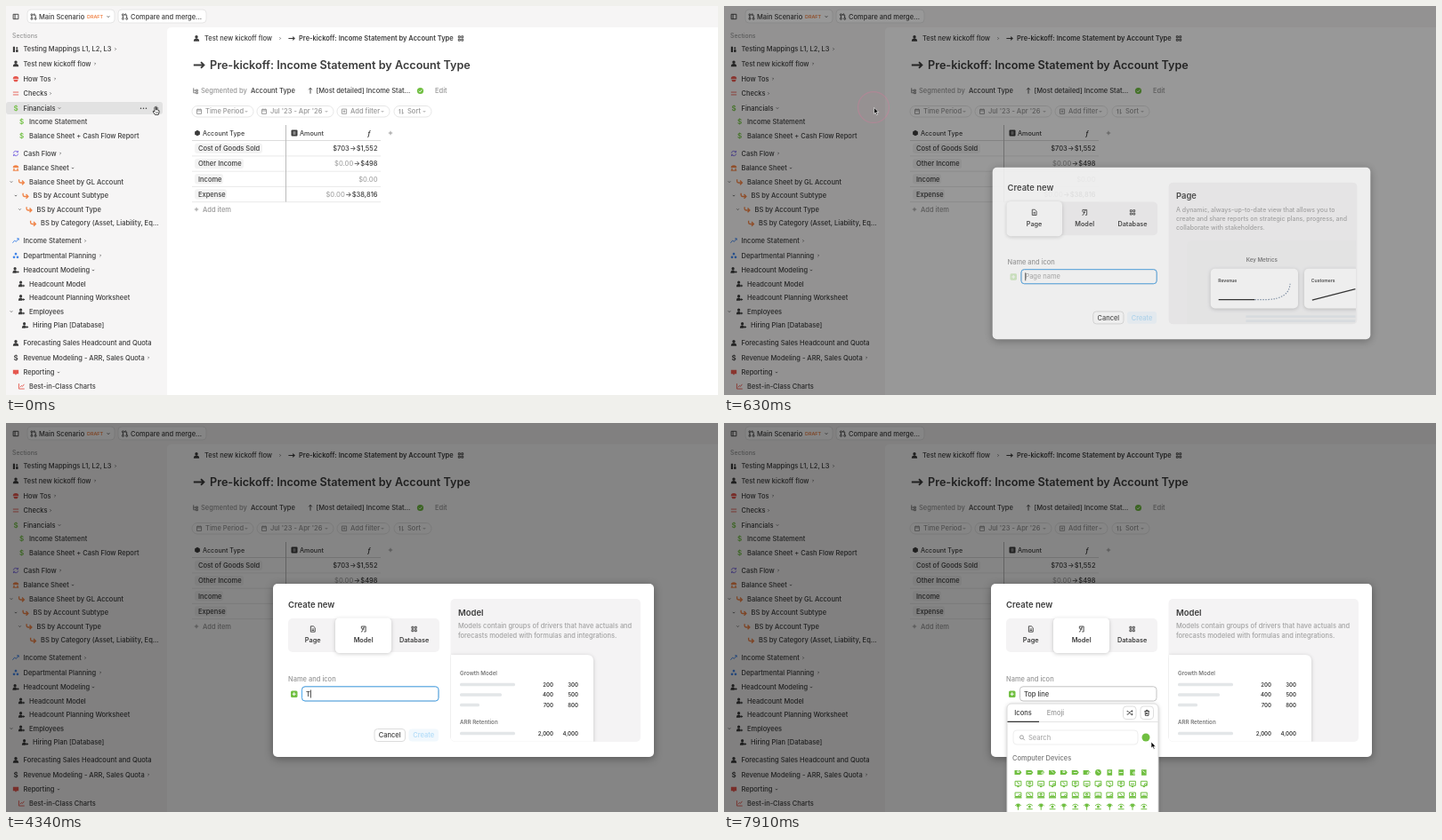
Write an HTML page that moves like this. It is 800 by 438 pixels and loops after 8 s.

```html
<!DOCTYPE html>
<html lang="en">
<head>
<meta charset="utf-8">
<title>Create a new model</title>
<style>
html, body { margin: 0; width: 100%; height: 100%; overflow: hidden; background: #fff; }
svg { display: block; width: 800px; height: 438px; }
text { font-family: Inter, "Liberation Sans", sans-serif; white-space: pre; }
.card { filter: drop-shadow(0 1px 2px rgba(0,0,0,.2)); }
</style>
</head>
<body>
<svg id="stage" viewBox="0 0 800 438"></svg>
<script>
const INK = '#3c3c3c', GRAY = '#969696', GREEN = '#70bf41', ORANGE = '#f08448',
  RED = '#e5584f', BLUE = '#4285e8', PURPLE = '#7b68e0';

// y is the vertical middle of the line
const text = (x, y, s, { size = 7.5, w = 500, fill = INK, at = 'start', id = '' } = {}) =>
  `<text x="${x}" y="${y + size * .36}" id="${id}" font-size="${size}" font-weight="${w}" fill="${fill}" text-anchor="${at}">${s}</text>`;
const rect = (x, y, w, h, r, fill, stroke = 'none', more = '') =>
  `<rect x="${x}" y="${y}" width="${w}" height="${h}" rx="${r}" fill="${fill}" stroke="${stroke}" ${more}/>`;
const line = (d, stroke, width = 1, more = '') =>
  `<path d="${d}" fill="none" stroke="${stroke}" stroke-width="${width}" ${more}/>`;
const group = (id, body, more = '') => `<g id="${id}" ${more}>${body}</g>`;
const dot = (x, y, r) => `M${x - r} ${y}a${r} ${r} 0 1 0 ${2 * r} 0a${r} ${r} 0 1 0 ${-2 * r} 0z`;
const box = (x, y, w, h) => `M${x} ${y}h${w}v${h}h${-w}z`;

const filled = {
  person: dot(0, -2, 1.9) + 'M-3.5 3.7q0-3.6 3.5-3.6t3.5 3.6z',
  staff: dot(-1, -2, 1.8) + 'M-4 3.7q0-3.6 3-3.6q1.6 0 2 1v2.6z' + box(1, 1.7, 3, 1) + box(2, .7, 1, 3),
  building: 'M-3.5-3h2.4v7h-2.4z' + dot(1.4, -1.2, 1.2) + box(.2, .6, 2.6, 3.4),
  book: 'M-3.6.2a3.6 3.6 0 0 1 7.2 0zM-3 1.2h6l-1.3 2.4h-3.4z',
  badge: 'M-3.5-3h7v5h-2.4l-1.1 1.6-1.1-1.6h-2.4z',
  cube: 'M0-3.5L3.2-1.8V2L0 3.7-3.2 2V-1.8z',
  hub: dot(0, -2, 1.5) + dot(-2.2, 2, 1.5) + dot(2.2, 2, 1.5),
  bank: 'M-3.6-.6a3.6 3 0 0 1 7.2 0z' + box(-3, .2, 1.5, 2.2) + box(1.5, .2, 1.5, 2.2) + box(-3.6, 2.6, 7.2, 1)
};
const stroked = {
  equals: 'M-3.5-1.6h7M-3.5 1.6h7',
  cycle: 'M-3-.5a3 3 0 0 1 5.4-1.2M3 .5a3 3 0 0 1-5.4 1.2M2.8-3.4v2h-2M-2.8 3.4v-2h2',
  bend: 'M-3.2-3v2.3q0 1.8 1.8 1.8h4.4M.6-1.6l2.6 2.7-2.6 2.6',
  trend: 'M-4 2.5l2.5-3 2 1.5 3-4M1.3-3h2.3v2.2',
  chart: 'M-3.4-3.2v6.6h7M-1.8 1.4l1.6-2 1.4 1 2-2.8',
  arrow: 'M-4 0h7.5M1.3-2.2l2.2 2.2-2.2 2.2',
  up: 'M0 3.5v-7M-2-1.3l2-2.2 2 2.2',
  plus: 'M-2.5 0h5M0-2.5v5',
  filter: box(-2.9, -2.9, 5.8, 5.8) + 'M-1.5 0h3M0-1.5v3',
  grid: box(-3, -3, 2.2, 2.2) + box(.8, -3, 2.2, 2.2) + box(-3, .8, 2.2, 2.2) + box(.8, .8, 2.2, 2.2),
  panel: box(-3.2, -3, 6.4, 6) + 'M-1-3v6',
  merge: dot(-2.3, -2.4, 1.1) + dot(-2.3, 2.6, 1.1) + dot(2.4, 2.6, 1.1) + 'M-2.3-1.2v2.6M2.4 1.4v-3q0-1-1-1h-1M1-4l-1.2 1.4 1.2 1.4',
  branch: 'M-2.5-3.5v6h2.5M-2.5-.5h2.5' + box(.5, -1.5, 2.2, 2) + box(.5, 1.5, 2.2, 2),
  calendar: box(-2.8, -2.5, 5.6, 5.5) + 'M-2.8-.8h5.6M-1.4-3.5v1.5M1.4-3.5v1.5',
  sort: 'M-1.5 3v-6l-1.5 1.6M1.5-3v6l1.5-1.6',
  page: 'M-2.6-3.5h3.4l2 2v5h-5.4zM-1.2 0h2.6M-1.2 1.7h2.6',
  model: 'M-2.5-.5v-2.8h5.3v6.6h-2M-3 3.4q1.6.3 2-1.6l.7-3q.4-1.3 1.8-1M-2 0h3',
  shuffle: 'M-3.5-2h1.5l3.6 4h2M-3.5 2h1.5l3.6-4h2M2.4-3.2l1.3 1.2-1.3 1.2M2.4.8l1.3 1.2-1.3 1.2',
  trash: 'M-3-2h6M-1-2v-1.3h2v1.3M-2.3-2l.3 5.4h4l.3-5.4M-.7-.3v2.2M.7-.3v2.2',
  search: dot(-.6, -.6, 2.2) + 'M1 1l2.2 2.2',
  down: 'M-1.4-.7l1.4 1.4 1.4-1.4',
  right: 'M-.6-1.3l1.3 1.3-1.3 1.3'
};
function icon(x, y, name, color = INK, k = .9) {
  if (name === '$') return text(x, y, '$', { size: 8, w: 600, fill: color, at: 'middle' });
  const width = name === 'bend' ? 1.5 : name === 'arrow' ? 1.2 : 1;
  const paint = filled[name] ? `fill="${color}"` : `fill="none" stroke="${color}" stroke-width="${width}"`;
  return `<path transform="translate(${x} ${y}) scale(${k})" d="${filled[name] || stroked[name]}" ${paint}/>`;
}

// y, indent, icon, colour, label, chevron after the label, tree chevron before it
const rows = [
  [48.5, 0, 'building', INK, 'Testing Mappings L1, L2, L3', [123, 'right']],
  [65, 0, 'person', INK, 'Test new kickoff flow', [100, 'right']],
  [82, 0, 'book', RED, 'How Tos', [55, 'right']],
  [98.5, 0, 'equals', RED, 'Checks', [50, 'right']],
  [115, 0, '$', GREEN, 'Financials', [60, 'down']],
  [130.5, 6.5, '$', GREEN, 'Income Statement'],
  [146, 6.5, '$', GREEN, 'Balance Sheet + Cash Flow Report'],
  [166, 0, 'cycle', PURPLE, 'Cash Flow', [61, 'right']],
  [182.5, 0, 'bank', ORANGE, 'Balance Sheet', [75, 'down']],
  [198, 6.5, 'bend', ORANGE, 'Balance Sheet by GL Account', 0, 6],
  [213.5, 11, 'bend', ORANGE, 'BS by Account Subtype', 0, 11],
  [229, 15, 'bend', ORANGE, 'BS by Account Type', 0, 15.5],
  [244.5, 19.5, 'bend', ORANGE, 'BS by Category (Asset, Liability, Eq...'],
  [264.5, 0, 'trend', BLUE, 'Income Statement', [89, 'right']],
  [281, 0, 'hub', BLUE, 'Departmental Planning', [106, 'right']],
  [297.5, 0, 'staff', INK, 'Headcount Modeling', [98, 'down']],
  [313, 6.5, 'staff', INK, 'Headcount Model'],
  [328.5, 6.5, 'staff', INK, 'Headcount Planning Worksheet'],
  [344, 6.5, 'staff', INK, 'Employees', 0, 6],
  [359.5, 10.5, 'staff', INK, 'Hiring Plan [Database]'],
  [379.5, 0, 'person', INK, 'Forecasting Sales Headcount and Quota'],
  [396, 0, '$', INK, 'Revenue Modeling - ARR, Sales Quota', [160, 'right']],
  [412.5, 0, 'badge', RED, 'Reporting', [59, 'down']],
  [428, 6.5, 'chart', RED, 'Best-in-Class Charts']
];

function sidebar() {
  const hover = rect(0, 108, 176, 14, 3, '#e2e2e2') + text(154.5, 113, '...', { size: 9, w: 700, at: 'middle' }) + icon(169, 115, 'plus');
  return text(7, 34, 'Sections', { size: 6.9, fill: GRAY }) + group('hover', hover) +
    rows.map(([y, dx, name, color, label, end, tree]) =>
      icon(11 + dx, y, name, color) + text(19.5 + dx, y, label) +
      (end ? icon(end[0], y, end[1], '#666') : '') + (tree ? icon(tree, y, 'down', '#666') : '')).join('');
}

function header() {
  const soft = { fill: GRAY }, title = 'Pre-kickoff: Income Statement by Account Type';
  const pills = [
    [209, 69, 'calendar', 'Time Period'], [282, 86, 'calendar', "Jul '23 - Apr '26"],
    [372, 59, 'filter', 'Add filter'], [436, 42, 'sort', 'Sort']
  ];
  return icon(11, 12, 'panel') +
    rect(24, 4, 98, 15, 4, '#fff', '#e6e6e6') + icon(31, 12, 'merge') + text(37, 12, 'Main Scenario') +
    text(91, 12, 'DRAFT', { size: 5.4, w: 600, fill: ORANGE }) + icon(115, 12, 'down') +
    rect(126, 4, 99, 15, 4, '#fff', '#e6e6e6') + icon(133.5, 12, 'merge') + text(140, 12, 'Compare and merge...') +
    icon(214, 36.5, 'person') + text(223, 36.5, 'Test new kickoff flow') + icon(308, 36.5, 'right', '#666') +
    icon(321, 36.5, 'arrow') + text(329, 36.5, title, { w: 600 }) + icon(511, 36.5, 'grid') +
    icon(217, 66.5, 'arrow', INK, 1.55) + text(229, 66.5, title, { size: 12.65, w: 600 }) +
    icon(213, 95.5, 'branch', '#777') + text(219, 95.5, 'Segmented by', soft) + text(275, 95.5, 'Account Type') +
    icon(342, 95.5, 'up') + text(348.5, 95.5, '[Most detailed] Income Stat...') +
    `<path d="${dot(465.5, 95.5, 3.6)}" fill="${GREEN}"/>` + line('M463.8 95.6l1.3 1.3 2.2-2.5', '#fff', .9) + text(482, 95.5, 'Edit', soft) +
    pills.map(([x, w, name, label]) => rect(x, 112.5, w, 12.5, 6, '#fff', '#e0e0e0', 'stroke-width=".8"') +
      icon(x + 8, 118.7, name, GRAY) + text(x + 15, 118.7, label, soft) + icon(x + w - 8, 118.7, 'down', GRAY)).join('');
}

function table() {
  const data = [['Cost of Goods Sold', 76, '$703', '$1,552'], ['Other Income', 55, '$0.00', '$498'],
    ['Income', 32, '$0.00', ''], ['Expense', 36, '$0.00', '$38,816']];
  return icon(215, 143, 'cube') + text(221, 143, 'Account Type', { size: 7.1 }) +
    rect(320.5, 139.5, 7, 7, 1, INK) + line('M322.5 142h3M322.5 144h3', '#fff', .8) + text(330, 143, 'Amount', { size: 7.2 }) +
    text(408, 143, '<tspan font-style="italic">ƒ</tspan>', { at: 'middle', w: 600 }) + icon(432, 143, 'plus', GRAY) +
    line('M209 151.5H421', '#dcdcdc') +
    data.map(([name, w, a, b], i) => {
      const y = 160.3 + i * 17.25;
      const from = `<tspan fill="${a === '$703' ? INK : '#a5a5a5'}">${a}</tspan>`;
      return rect(212, y - 5.8, w, 11.6, 3, '#f3f3f3') + text(216, y, name) +
        text(417.5, y, from + (b && `<tspan dx=".4">→</tspan><tspan dx=".4">${b}</tspan>`), { at: 'end' }) +
        line(`M209 ${y + 8.6}H421`, '#e4e4e4', .8);
    }).join('') +
    line('M314.5 134V220.5', '#bbb') + icon(214, 229, 'plus', GRAY) + text(221, 229, 'Add item', { fill: GRAY });
}

function previews() {
  const small = { size: 6.2, w: 600, fill: '#777' };
  const title = s => text(508, 213.5, s, { size: 9.5, w: 600 });
  const lines = (size, list) => list.map((s, i) => text(508, 228.7 + i * 10.4, s, { size, fill: '#a2a2a2' })).join('');
  const card = x => rect(x, 296, 99, 45, 5, '#fff', 'none', 'class="card"');
  const label = { size: 5.1, w: 600 };
  const page = title('Page') + lines(7, ['A dynamic, always-up-to-date view that allows you to',
      'create and share reports on strategic plans, progress, and', 'collaborate with stakeholders.']) +
    rect(520, 264, 200, 110, 6, '#f1f1f2') + text(605, 285.5, 'Key Metrics', { ...small, at: 'middle' }) +
    rect(587, 349, 124, 2.5, 0, '#e3e8ec') + rect(587, 354, 124, 2.5, 0, '#e3e8ec') +
    card(547) + text(555.5, 309, 'Revenue', label) + line('M556 331h41', '#222', 1.4) +
    line('M597 331h14q25-1 26-18', '#7f91a8', 1.2, 'stroke-dasharray="1.5 1.5"') +
    card(653) + text(661, 309, 'Customers', label) + line('M662 331.5L711 319', '#222', 1.2);
  const entry = (y, w, a, b) => rect(510, y - 1.8, w, 3.6, 1.5, '#e3e6e8') +
    [[615, a], [643, b]].map(([x, s]) => text(x, y, s, { size: 6, w: 600, at: 'end' })).join('');
  const model = title('Model') + lines(7.45, ['Models contain groups of drivers that have actuals and', 'forecasts modeled with formulas and integrations.']) +
    '<path class="card" d="M500 261H653q7 0 7 7V364H500z" fill="#fff"/>' +
    text(510, 282, 'Growth Model', small) + entry(294.5, 62, 200, 300) + entry(306, 47, 400, 500) + entry(317.5, 22, 700, 800) +
    text(510, 336.5, 'ARR Retention', small) + entry(349.5, 62, '2,000', '4,000');
  return rect(499.5, 198, 213.5, 161, 5, '#f4f3f4') +
    `<clipPath id="clip">${rect(499.5, 198, 212, 160.5, 5, '#000')}</clipPath>` +
    `<g clip-path="url(#clip)">${group('pageView', page)}${group('modelView', model)}</g>`;
}

function modal() {
  const tab = (id, name, label) => group(id, icon(0, 232, name) + text(0, 244.7, label, { size: 7.3, w: 600, at: 'middle' }));
  return rect(300, 181, 428, 195, 5, '#fff', 'none', 'style="filter:drop-shadow(0 2px 5px rgba(0,0,0,.35))"') +
    text(317, 204.5, 'Create new', { size: 9.5, w: 600 }) +
    rect(317, 220, 170, 38, 5, '#f4f3f4') + rect(0, 219.5, 63, 39.5, 4.5, '#fff', 'none', 'id="pill" class="card"') +
    tab('tabPage', 'page', 'Page') + tab('tabModel', 'model', 'Model') + tab('tabData', 'grid', 'Database') +
    text(317, 288, 'Name and icon', { fill: GRAY }) +
    group('badge', rect(320, 301.5, 7.5, 7.5, 1.5, GREEN) + line('M321.7 305.2h4M323.7 303.2v4', '#fff')) +
    rect(332.5, 296.8, 153.5, 16.2, 3.5, '#fff', '#c4c4c4') +
    rect(332.5, 296.8, 153.5, 16.2, 3.5, 'none', '#4eaaf0', 'id="focus"') +
    text(337, 305, '', { id: 'value' }) + rect(0, 300.5, .8, 9, 0, '#222', 'none', 'id="caret"') +
    rect(414, 344.5, 34.5, 14, 3.5, '#fff', '#dcdcdc') + text(431.2, 351.6, 'Cancel', { at: 'middle' }) +
    rect(452.5, 344.5, 33.5, 14, 3.5, '#f2f9fe') + text(469.2, 351.6, 'Create', { at: 'middle', fill: '#b2dcf9' }) +
    group('create', rect(452.5, 344.5, 33.5, 14, 3.5, '#ddf0fd', '#b0dbf9') + text(469.2, 351.6, 'Create', { at: 'middle', fill: '#2b96e6' })) +
    previews();
}

function glyph(row, col) {
  const v = (row * 5 + col * 7) % 4;
  const mark = [box(-1, -1.6, 2, 1.6), 'M-1.5-2l3 2.4', dot(1.8, .6, 1.2), 'M-2 0h4'][v];
  const solid = [
    col < 7 ? 'M-4-2.5h6l2 2.5-2 2.5h-6z' : dot(0, 0, 3.4),
    box(-1.2, 2.6, 2.4, 1.2), box(-4, 2, 8, 1.4),
    v % 2 ? box(-1.8, -3.2, 3.6, 3.6) + box(-.5, 0, 1, 3.8) : dot(0, 0, 1.5) + box(-3.4, 2.4, 6.8, 1)
  ][row];
  const outline = row === 1 || row === 2 ? box(-3.4, -3, 6.8, row === 1 ? 5 : 4.4) + mark : row === 3 ? 'M-3.4-1q3.4-3.4 6.8 0' : '';
  const hole = row ? '' : line(mark, '#fff', .8);
  return `<g transform="translate(${330.5 + col * 12.85} ${393.5 + row * 12.8})"><path d="${row || col < 8 ? solid : box(-2.8, -3.3, 5.6, 6.6)}" fill="${GREEN}"/>` +
    line(outline, GREEN) + hole + '</g>';
}

function picker() {
  let s = rect(318, 316, 170, 140, 5, '#fff', '#dcdcdc', 'class="card"') +
    text(336, 326.5, 'Icons', { at: 'middle' }) + text(372.5, 326.5, 'Emoji', { at: 'middle', fill: GRAY }) +
    line('M318 336.5H488', '#e4e4e4') + line('M318.5 336.3H354', '#333', 1.2) +
    rect(448.5, 319, 14.5, 14.5, 3.5, '#fff', '#dedede') + icon(455.8, 326.3, 'shuffle') +
    rect(468, 319, 14.5, 14.5, 3.5, '#fff', '#dedede') + icon(475.2, 326.3, 'trash') +
    rect(325, 346, 140, 16, 4, '#fff', '#eee') + icon(335, 354.3, 'search', GRAY) + text(342, 354.3, 'Search', { fill: '#aaa' }) +
    `<path d="${dot(474, 354, 4.5)}" fill="${GREEN}"/>` + text(324, 377.3, 'Computer Devices', { fill: '#777' });
  for (let i = 0; i < 48; i++) s += glyph(i / 12 | 0, i % 12);
  return s;
}

const pointers =
  group('arrow', '<path transform="scale(1.1)" d="M0 0v6.4l1.5-1.3 1.1 2.4 1.1-.5-1.1-2.3h2z" fill="#000" stroke="#fff" stroke-width=".6"/>') +
  group('hand', '<path d="M-1 .6q0-1 .8-1t.8 1v2.2q2-.2 3.4.8.5 2.4-.8 4.8h-3.8q-1-2-2.4-3.6.6-1.2 2 0z" fill="#fff" stroke="#111" stroke-width=".8"/><path d="M.8 5v2M2.2 5v2" stroke="#111" stroke-width=".5"/>') +
  group('beam', line('M-1.5-3.7q1.5 0 1.5.8 0-.8 1.5-.8M0-3v6M-1.5 3.7q1.5 0 1.5-.8 0 .8 1.5.8', '#111', .9));

document.getElementById('stage').innerHTML =
  rect(0, 0, 800, 438, 0, '#f6f5f5') + '<path d="M800 24H186q-5 0-5 5V438H800z" fill="#fff"/>' +
  header() + sidebar() + table() +
  rect(0, 0, 800, 438, 0, '#000', 'none', 'id="shade"') +
  group('modal', modal()) + group('picker', picker()) +
  '<circle id="ring" fill="#f06b9b" fill-opacity=".1" stroke="#ee6f9c" stroke-width="1.2"/>' +
  group('pointer', pointers);

const $ = id => document.getElementById(id);
const set = (id, name, v) => $(id).setAttribute(name, v);
const fade = (id, v) => set(id, 'opacity', v);
const ramp = (t, a, b) => Math.min(1, Math.max(0, (t - a) / (b - a)));
const easeOut = p => 1 - (1 - p) ** 2;
const smooth = p => p * p * (3 - 2 * p);
const mix = (a, b, p) => a + (b - a) * p;

// start, end, from, to
const moves = [
  [600, 1610, [168, 114], [404, 244]],
  [2380, 3010, [404, 244], [359, 304]],
  [6020, 6510, [359, 304], [324, 311.5]],
  [7350, 7910, [324, 311.5], [480, 359]]
];
const clicks = [[350, 168, 114], [1750, 404, 245], [3150, 359, 304], [6650, 324, 311]];
const keys = [4340, 4480, 4690, 4970, 5180, 5320, 5530, 5600];

function drawPointer(t) {
  let [x, y] = moves[0][2];
  for (const [a, b, from, to] of moves) if (t >= a) {
    const p = smooth(ramp(t, a, b));
    x = mix(from[0], to[0], p);
    y = mix(from[1], to[1], p);
  }
  const onTabs = x > 317 && x < 487 && y > 220 && y < 258;
  const onField = x > 332 && x < 486 && y > 297 && y < 313;
  const onBadge = x < 330 && t > 6100;
  const kind = t < 450 || onTabs || onBadge ? 'hand' : onField && t < 7000 ? 'beam' : 'arrow';
  for (const k of ['arrow', 'hand', 'beam']) fade(k, +(k === kind));
  set('pointer', 'transform', `translate(${x} ${y})`);
  fade('pointer', +(t < 4340 || t >= 6020));

  const hit = clicks.find(([a]) => t >= a && t < a + 400);
  fade('ring', hit ? 1 - (t - hit[0]) / 400 : 0);
  if (hit) {
    set('ring', 'cx', hit[1]);
    set('ring', 'cy', hit[2]);
    set('ring', 'r', 18 * (1 - Math.exp((hit[0] - t) / 80)));
  }
}

function drawField(t) {
  const typed = keys.filter(k => t >= k).length;
  const value = $('value');
  value.textContent = typed ? 'Top line'.slice(0, typed) : t < 1800 ? 'Page name' : 'Model name';
  value.setAttribute('fill', typed ? INK : '#b0b0b0');
  set('caret', 'x', 337 + (typed ? value.getComputedTextLength() : 0));
  const focused = t < 1750 || (t >= 3180 && t < 6650);
  const since = t - (typed ? keys[typed - 1] : t < 1750 ? 450 : 3180);
  fade('caret', +(focused && Math.floor(since / 530) % 2 === 0));
  fade('focus', t < 2500 ? 1 - ramp(t, 1750, 1900) : ramp(t, 3220, 3400) - ramp(t, 6650, 6760));
  fade('create', ramp(t, 4340, 4500));
}

function draw() {
  const t = performance.now() % 8000;
  const open = easeOut(ramp(t, 450, 750));
  fade('hover', +(t < 450));
  fade('shade', .48 * open);
  fade('modal', open);
  set('modal', 'transform', `translate(514 278.5) scale(${mix(.95, 1, open)}) translate(-514 -278.5)`);
  fade('badge', ramp(t, 600, 700));

  const swap = easeOut(ramp(t, 1770, 2000));
  set('pill', 'x', mix(316, 370, swap));
  for (const [id, a, b] of [['tabPage', 347.3, 344.7], ['tabModel', 404.3, 401.6], ['tabData', 458.6, 458.6]])
    set(id, 'transform', `translate(${mix(a, b, swap)} 0)`);
  fade('pageView', 1 - swap);
  fade('modelView', swap);

  const shown = ramp(t, 6700, 7000);
  fade('picker', shown);
  set('picker', 'transform', `translate(0 ${-4 * (1 - shown)})`);
  drawField(t);
  drawPointer(t);
  requestAnimationFrame(draw);
}
draw();
</script>
</body>
</html>
```
